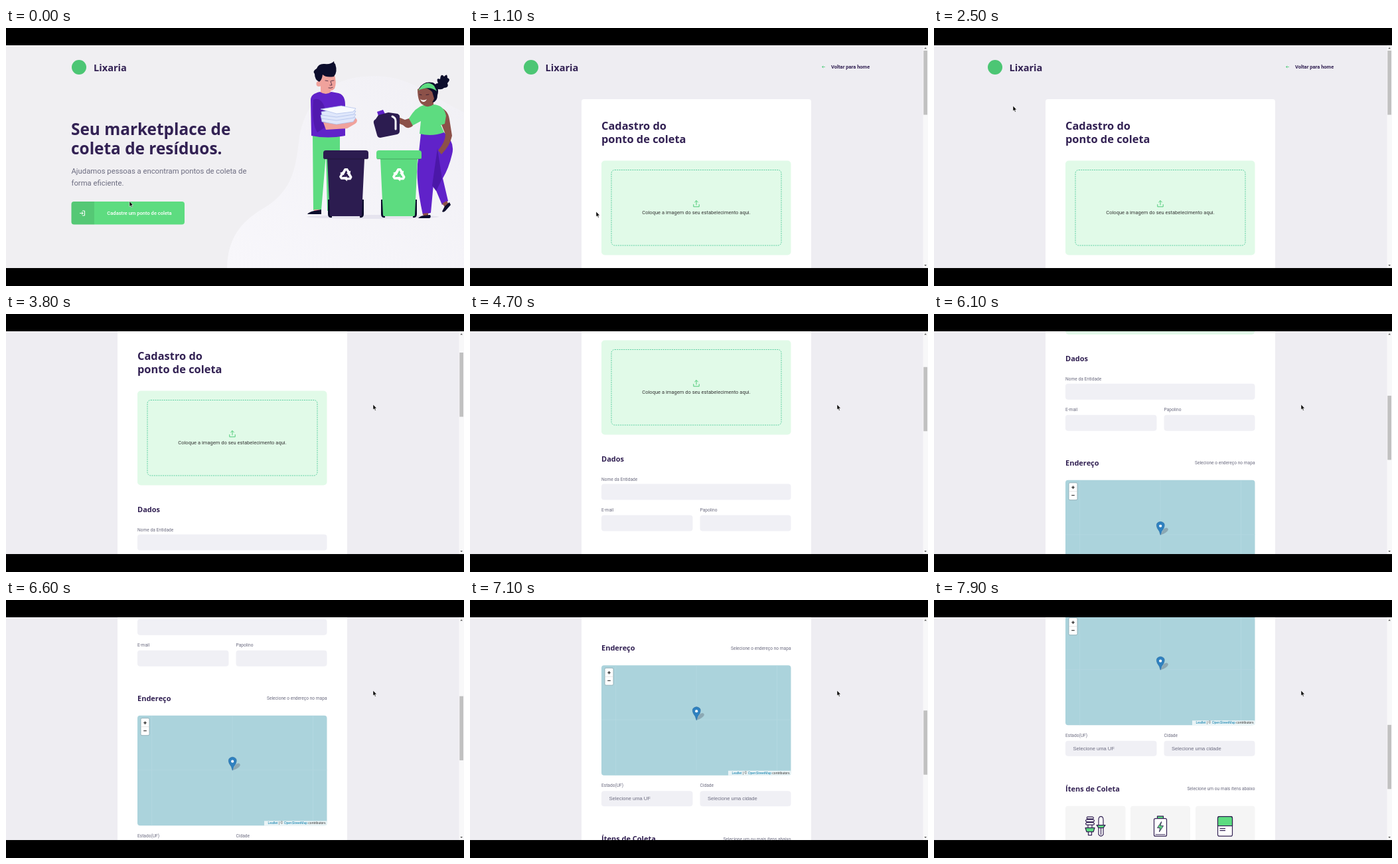
Write an HTML page that moves like this. It is 690 px wide and 388 px high and loops after 8 s.

```html
<!DOCTYPE html>
<html lang="pt-BR">
<head>
<meta charset="utf-8">
<title>Pontos de coleta</title>
<style>
  html, body { margin: 0; width: 100%; height: 100%; overflow: hidden; background: #000; }
  svg { display: block; width: 690px; height: 388px; }
  text { font: 6.64px Roboto, sans-serif; fill: #6c6c80; }
  .head { font-family: "Open Sans", sans-serif; font-weight: 700; fill: #322153; }
  .h1 { font-size: 24.4px; }
  .h2 { font-size: 16.4px; }
  .h3 { font-size: 11px; }
  .brand { font-size: 14.6px; }
  .lead { font-size: 11.3px; }
  .small { font-size: 7.55px; }
  .select { font: 7.6px "Liberation Sans", sans-serif; }
  .credit { font: 5px "Liberation Sans", sans-serif; fill: #333; }
  .credit tspan { fill: #0078a8; }
  .end { text-anchor: end; }
  .mid { text-anchor: middle; }
  .field { fill: #f0f0f5; }
  .line { fill: none; stroke-linecap: round; stroke-linejoin: round; }
  .icon { fill: #fff; stroke: #322153; stroke-width: 1.2; stroke-linejoin: round; stroke-linecap: round; }
  .green { fill: #5ddc80; }
  .dark { fill: #2c1c50; }
  .purple { fill: #6022c9; }
  .ink { fill: #0c0d2c; }
  .pale { fill: #f0a29c; }
  .brown { fill: #8c5149; }
</style>
</head>
<body>
<svg viewBox="0 0 690 388">
  <defs>
    <linearGradient id="glow" x1="0" y1="1" x2="1" y2="0">
      <stop offset="0" stop-color="#f8f7fb"/><stop offset="1" stop-color="#f1f0f5"/>
    </linearGradient>
    <path id="arrow" d="M-6-3.2L-2.6-9.2Q-2-10-1-10H2.6L5.6-5.4 7.3-6.4 6.3-.6 .8-2.6 2.5-3.6 .4-7 -2.4-1.2Z"/>
    <g id="cycle" fill="#fff">
      <use href="#arrow"/>
      <use href="#arrow" transform="rotate(120)"/>
      <use href="#arrow" transform="rotate(240)"/>
    </g>
    <g id="bin">
      <path class="ink" d="M7 74h6v27q-6 1-6-5zM61 74h-6v27q6 1 6-5z"/>
      <path d="M6 12H62L58 97Q58 99 56 99H12Q10 99 10 97Z"/>
      <path d="M4 0H64Q68 0 68 4V11Q68 13 66 13H2Q0 13 0 11V4Q0 0 4 0Z"/>
      <path d="M1 13H67" stroke="#000" stroke-opacity=".25"/>
      <use href="#cycle" x="34" y="37"/>
    </g>
  </defs>

  <g id="home">
    <path fill="#f0eff2" d="M0 26H690V361H0Z"/>
    <path fill="url(#glow)" d="M333 361C334 318 352 292 388 271C430 246 436 214 441 172C447 116 482 78 538 73C602 67 626 94 690 127V361Z"/>
    <circle cx="110" cy="59" r="11" fill="#4cc674"/>
    <text class="head brand" x="132" y="64.5">Lixaria</text>
    <text class="head h1" x="98" y="161">Seu marketplace de</text>
    <text class="head h1" x="98" y="190">coleta de resíduos.</text>
    <text class="lead" x="98.5" y="219">Ajudamos pessoas a encontram pontos de coleta de</text>
    <text class="lead" x="98.5" y="237">forma eficiente.</text>

    <rect class="green" x="98.5" y="261" width="170.5" height="34.5" rx="4"/>
    <path fill="#000" opacity=".09" d="M133 261H102.5Q98.500 261 98.500 265V291.500Q98.500 295.500 102.500 295.500H133Z"/>
    <path class="line" stroke="#fff" d="M115.500 275H118.500V282H115.500M111.500 278.500H116M114.300 276.600L116.200 278.500 114.300 280.400"/>
    <text class="small mid" x="201" y="280.500" style="fill:#fff;font-weight:500">Cadastre um ponto de coleta</text>

    <ellipse cx="553" cy="284" rx="100" ry="3" fill="#e6e4ee"/>
    <!-- man -->
    <path class="green" d="M462 160H503V200L497 275H484L482 190L475 274H463Z"/>
    <path class="pale" d="M464 273H473V276H464Z"/>
    <path class="ink" d="M464 275L475 273V280H454Q456 277 464 275Z"/>
    <path class="pale" d="M474 84H489V98Q482 106 474 98Z"/>
    <path class="purple" d="M473 96Q482 102 490 96L501 98Q511 101 511 115V162Q485 167 460 162L459 108Q459 99 473 96Z"/>
    <path class="pale" d="M472 70Q483 63 494 68Q499 82 495 91Q490 97 480 93Q473 90 472 70Z"/>
    <circle class="pale" cx="471.500" cy="84" r="4"/>
    <path class="ink" d="M472 81Q465 78 465 69Q461 65 468 61Q471 53 480 54Q490 55 494 50Q494 53 496 54Q500 66 494 73Q482 75 477 70Q476 78 472 81Z"/>
    <path class="line" stroke="#3a1d38" stroke-width=".8" d="M481 79l4 .6M490 79.500l4-.6M486 90q3 1 6-.5M489 80l2 6h-3"/>
    <path fill="#5119ae" d="M463 108Q474 103 480 119L484 147L469 157Q460 144 463 108Z"/>
    <path class="pale" d="M478 142L512 143L526 135Q532 139 526 144L514 151L482 153Z"/>
    <g fill="#dfe7fb" stroke="#a9bbe8" stroke-width=".7">
      <path d="M475 136l30-4 22 3-4 6-25 4-22-4z"/>
      <path d="M474 131l30-5 23 4-3 5-26 4-23-3z"/>
      <path d="M475 126l30-5 22 4-3 5-26 4-22-3z"/>
      <path fill="#f8faff" d="M474 122l31-5 22 4-4 5-25 3z"/>
    </g>

    <!-- woman -->
    <path class="purple" d="M625 159L660 157Q677 172 672 190Q667 211 658 226L666 260L657 266L644 235L640 278L628 281Q616 226 621 196Z"/>
    <path fill="#4b17a8" d="M650 181L642 237L648 245L657 227Z"/>
    <path class="brown" d="M628 279l8-1v5h-7zM657 264l7-4 3 5-6 4z"/>
    <path class="ink" d="M639 281q2 4-1 5h-17q4-4 9-4zM661 268l7-6 2 4-8 9q-3 3-5 1z"/>
    <path class="brown" d="M650 118Q666 122 668 137L672 162Q669 177 656 190L651 184Q662 171 662 160L654 140Z"/>
    <path class="brown" d="M629 109H644V120Q636 126 629 119Z"/>
    <path class="green" d="M629 116Q636 121 644 115Q660 116 663 132L661 144L655 146L660 157Q642 164 623 159L625 140L612 147L607 136Q617 119 629 116Z"/>
    <path class="brown" d="M607 136L613 147Q606 154 598 146L586 141Q584 134 589 133L601 138Z"/>
    <path class="ink" d="M648 91Q644 83 651 83Q647 74 654 77Q655 67 660 73Q665 67 665 75Q671 77 665 83Q668 90 660 90Q656 94 648 91Z"/>
    <path class="ink" d="M622 91Q629 79 643 82Q654 88 650 101Q650 110 643 112Z"/>
    <path class="brown" d="M620 92Q631 86 642 96L645 106Q642 117 630 116Q620 114 620 92Z"/>
    <path class="green" d="M621 94Q632 76 645 87L649 95Q638 86 621 94Z"/>
    <path class="line" stroke="#25132b" stroke-width=".8" d="M623 100l3 .6M633 100.500l4-.5"/>
    <path fill="#fff" d="M624 107q5 3 10 0-3 6-8 3z"/>
    <!-- jug -->
    <path class="purple" d="M559 126l9-3 3 6-10 3z"/>
    <path class="dark" d="M561 131L576 127L590 129Q594 131 593 135V155Q593 159 589 160L564 165Q560 165 559 161L554 143Q553 139 557 137Z"/>
    <path class="line" stroke="#f4f3f8" stroke-width="3" d="M582 133q5 2 5 7v12"/>

    <use href="#bin" class="dark" x="478" y="184"/>
    <use href="#bin" class="green" x="558" y="184"/>
  </g>

  <g id="form">
    <path fill="#eeedf2" d="M0 26H690V361H0Z"/>
    <g id="page">
      <circle cx="92" cy="59" r="11" fill="#4cc674"/>
      <text class="head brand" x="113.500" y="64.500">Lixaria</text>
      <path class="line" stroke="#4ecb79" stroke-width=".8" d="M534.500 58.500H530.500M532 57L530.500 58.500 532 60"/>
      <text class="small" x="544" y="61.200" style="fill:#322153;font-weight:600">Voltar para home</text>

      <rect x="168" y="107" width="346" height="1000" rx="4" fill="#fff"/>
      <text class="head h2" x="198" y="153">Cadastro do</text>
      <text class="head h2" x="198" y="172.500">ponto de coleta</text>

      <rect x="198" y="199.500" width="285.500" height="142" rx="5" fill="#e1fae8"/>
      <rect x="213" y="213.500" width="256" height="113.500" rx="5" fill="none" stroke="#4ecb9a" stroke-dasharray="2 1.300" stroke-width=".9"/>
      <path class="line" stroke="#4ecb79" d="M336.800 265.500V268.800H345.200V265.500M341 266V259.800M338.600 262L341 259.600 343.400 262"/>
      <text class="small mid" x="341" y="280" style="fill:#333">Coloque a imagem do seu estabelecimento aqui.</text>

      <text class="head h3" x="198" y="382">Dados</text>
      <text x="198" y="410.500">Nome da Entidade</text>
      <rect class="field" x="198" y="415.500" width="285.500" height="24" rx="4"/>
      <text x="198" y="457">E-mail</text>
      <text x="346.500" y="457">Papolino</text>
      <rect class="field" x="198" y="462.500" width="137.500" height="24" rx="4"/>
      <rect class="field" x="346.500" y="462.500" width="137" height="24" rx="4"/>

      <text class="head h3" x="198" y="538.500">Endereço</text>
      <text class="end" x="483.500" y="537">Selecione o endereço no mapa</text>
      <rect x="198" y="560.500" width="285.500" height="165.500" rx="4" fill="#abd3dc"/>
      <path stroke="#b5d9e1" stroke-width=".7" d="M219.500 561V726M341 561V719M462.500 561V719M198 642.500H483.500"/>
      <rect x="203" y="564.500" width="13" height="26" rx="2" fill="#fff" stroke="#8fadb5" stroke-width=".9"/>
      <path stroke="#ccc" stroke-width=".5" d="M203.500 577.500H215.500"/>
      <path stroke="#111" stroke-width="1.100" d="M207.200 571.500H211.800M209.500 569.200V573.800M207.200 583.500H211.800"/>
      <path fill="#445" opacity=".3" d="M341 643L346 634Q352 630 353 635Q351 640 341 643Z"/>
      <path fill="#2f81c0" stroke="#2a6ba0" stroke-width=".6" d="M341.200 643Q340 637 336.500 633Q333.500 626 338 624Q341.200 622 344.500 624Q349 626 346 633Q342.500 637 341.200 643Z"/>
      <circle cx="341.200" cy="629.500" r="2.100" fill="#fff"/>
      <path fill="#fff" opacity=".75" d="M389 719H483.500V723L481 726H389Z"/>
      <text class="credit end" x="481.500" y="724.300"><tspan>Leaflet</tspan> | © <tspan>OpenStreetMap</tspan> contributors</text>

      <text x="198" y="743.500">Estado(UF)</text>
      <text x="346.500" y="743.500">Cidade</text>
      <rect class="field" x="198" y="749.500" width="137.500" height="23" rx="4"/>
      <rect class="field" x="346.500" y="749.500" width="137" height="23" rx="4"/>
      <text class="select" x="209.500" y="763.700">Selecione uma UF</text>
      <text class="select" x="358" y="763.700">Selecione uma cidade</text>

      <text class="head h3" x="198" y="825.500">Ítens de Coleta</text>
      <text class="end" x="483.500" y="824.300">Selecione um ou mais ítens abaixo</text>
      <g fill="#f5f5f5">
        <rect x="198" y="847.500" width="90.500" height="85" rx="4"/>
        <rect x="296" y="847.500" width="90" height="85" rx="4"/>
        <rect x="394" y="847.500" width="89.500" height="85" rx="4"/>
      </g>
      <g class="icon" transform="translate(243 878.500)">
        <path d="M-12-14.500H-4Q-1-13-4-11.500H-11Q-14-12-12-14.500ZM-13-10.500H-3Q0-9-3-7H-13Q-16-9-13-10.500ZM-13-6H-3Q0-4-3-2.500H-13Q-16-4-13-6ZM-11-2.500V2M-5-2.500V2"/>
        <path class="green" d="M-15 2H-1L-3 8H-13Z"/>
        <path d="M-10.500 8H-5.500V13H-10.500Z"/>
        <path d="M5-2V-10Q5-15 8.500-15Q12-15 12-10V-2Z"/>
        <path class="green" d="M2-2H15L12 2H5Z"/>
        <path d="M5 2H12V12Q8.500 17 5 12ZM8.500 2V12"/>
      </g>
      <g class="icon" transform="translate(341 878.500)">
        <path class="green" d="M-4.500-15.500H4.500V-11H-4.500Z"/>
        <rect x="-9.500" y="-12" width="19" height="26.500" rx="2"/>
        <path stroke-width=".9" d="M-7 12H7"/>
        <path class="green" stroke-width=".9" d="M1.500-7L-4.500 2H-.5L-1.500 8 4.500-1H.5Z"/>
      </g>
      <g class="icon" transform="translate(438.500 878.500)">
        <rect x="-11" y="-15" width="22" height="29.500" rx="2.500"/>
        <path class="green" d="M-11-1V-12.500Q-11-15-8.500-15H8.500Q11-15 11-12.500V-1Z"/>
        <path d="M-7.500 3H0M-7.500 6H0"/>
      </g>
    </g>
    <path fill="#f8f8f9" d="M682.500 26H690V361H682.500Z"/>
    <rect id="thumb" x="683.300" y="34" width="5.700" height="96.500" fill="#c1c1c1"/>
    <path fill="#505050" d="M684.300 31.300H688L686.150 29.300ZM684.300 356H688L686.150 358Z"/>
  </g>

  <path id="cursor" fill="#000" stroke="#fff" stroke-width=".6" d="M0 0V8L1.800 6.400 3 9.300 4.300 8.700 3.100 5.900H5.500Z"/>
  <path d="M0 0H690V26H0ZM0 361H690V388H0Z"/>
</svg>
<script>
  const LOOP = 8000, OPEN_FORM = 700;
  const $ = id => document.getElementById(id);
  const progress = (t, from, to) => Math.min(1, Math.max(0, (t - from) / (to - from)));
  const easeOut = p => 1 - (1 - p) ** 3;
  const easeInOut = p => p * p * (3 - 2 * p);

  // wheel turns: start, end, distance
  const turns = [
    [2850, 3550, 84], [3980, 4280, 76], [4960, 5260, 76], [5860, 6160, 75.3],
    [6300, 6600, 75.5], [6770, 7070, 75.5], [7460, 7760, 75.5]
  ];
  // pointer moves: start, end, x, y
  const moves = [[100, 480, 190, 276], [1480, 2300, 119, 117], [2560, 2950, 553, 136]];

  function draw(t) {
    const onForm = t >= OPEN_FORM;
    $("home").style.display = onForm ? "none" : "";
    $("form").style.display = onForm ? "" : "none";

    const scroll = turns.reduce((sum, [from, to, dist]) => sum + dist * easeOut(progress(t, from, to)), 0);
    $("page").setAttribute("transform", `translate(0 ${-scroll})`);
    $("thumb").setAttribute("y", 34 + scroll * .286);

    let x = 186, y = 260.5;
    for (const [from, to, toX, toY] of moves) {
      const p = easeInOut(progress(t, from, to));
      x += (toX - x) * p;
      y += (toY - y) * p;
    }
    $("cursor").setAttribute("transform", `translate(${x} ${y})`);
  }

  const start = performance.now();
  function tick() {
    draw((performance.now() - start) % LOOP);
    requestAnimationFrame(tick);
  }
  tick();
</script>
</body>
</html>
```
